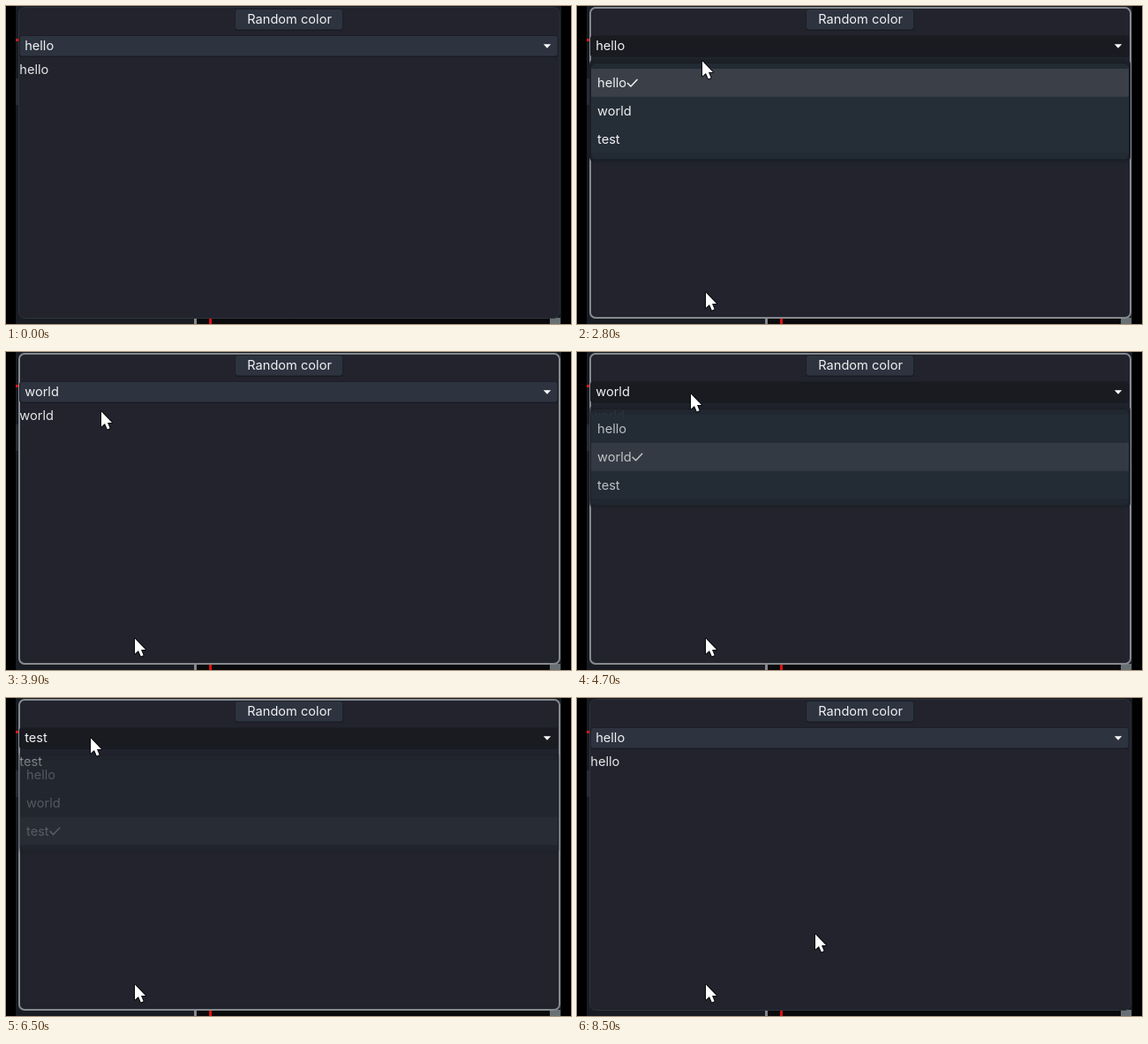
An HTML page with a canvas for the animation above (8.6 s loop, 640 px wide and 360 px high).

```html
<!DOCTYPE html>
<html lang="en">
<head>
<meta charset="utf-8">
<title>Drop-down demo</title>
<style>
  html, body { margin: 0; width: 100%; height: 100%; overflow: hidden; background: #000; }
  canvas { display: block; }
</style>
</head>
<body>
<canvas id="stage" width="640" height="360"></canvas>
<script>
const ctx = document.getElementById('stage').getContext('2d');
const LOOP = 8600, STEP = 100, FADE = 400;
const ITEMS = ['hello', 'world', 'test'];
const ROW_TOP = 71, ROW_HEIGHT = 31.8;
const FACE = '#2d3440', LIGHT = '#f0f1f2', ACCENT = '#17a3ab';

// Pointer moves: start time and goal; the duration follows from the distance
const HOME = [145, 324];
const MOVES = [
  [900, 146, 62], [1800, 141, 62], [2800, 100, 113],
  [3600, 107, 67], [3900, 128, 47], [4900, 57, 142],
  [5600, 95, 45], [6700, 62, 82], [7100, 269, 267]
];
// Times the menu opens and closes; each visit picks the next item
const MENUS = [[2300, 3300], [4400, 5500], [6400, 7200]];

const clamp = v => Math.max(0, Math.min(1, v));

function pointerAt(t) {
  let [x, y] = HOME;
  for (const [start, goalX, goalY] of MOVES) {
    const duration = 200 + 1.8 * Math.hypot(goalX - x, goalY - y);
    const k = clamp((t - start) / duration), eased = k * k * (3 - 2 * k);
    x += (goalX - x) * eased;
    y += (goalY - y) * eased;
    if (k < 1) break;
  }
  return [x, y];
}

function menuAt(t) {
  const state = { selected: 0, alpha: 0, open: false };
  for (const [start, end] of MENUS) {
    if (t < start) break;
    state.open = t < end;
    state.alpha = state.open ? clamp((t - start) / FADE) : clamp(1 - (t - end + STEP) / FADE);
    if (!state.open) state.selected = (state.selected + 1) % ITEMS.length;
  }
  return state;
}

function rect(x, y, w, h, fill) {
  ctx.fillStyle = fill;
  ctx.fillRect(x, y, w, h);
}

function box(x, y, w, h, r, fill, stroke, line = 1) {
  ctx.beginPath();
  ctx.roundRect(x, y, w, h, r);
  if (fill) { ctx.fillStyle = fill; ctx.fill(); }
  if (stroke) { ctx.strokeStyle = stroke; ctx.lineWidth = line; ctx.stroke(); }
}

function text(s, x, y, color = LIGHT) {
  ctx.fillStyle = color;
  ctx.fillText(s, x, y);
}

function poly(points, x, y) {
  ctx.beginPath();
  points.forEach(([px, py]) => ctx.lineTo(x + px, y + py));
}

function raised(x, y, w, h, fill = FACE) {
  box(x, y + 1, w, h, 3, '#15181e');
  box(x, y, w, h, 3, fill, '#1b1f26');
}

function backdrop() {
  rect(0, 0, 640, 360, '#000');
  rect(11, 0, 618, 360, '#191c23');
  rect(11, 37, 3, 3, '#d01818');
  rect(11, 82, 3, 30, '#292c35');
  rect(216, 353, 400, 7, '#0a0a0d');
  rect(213, 353, 3, 7, '#85878a');
  rect(230, 353, 3, 7, '#e01010');
  rect(616, 353, 12, 7, '#687074');
}

function appWindow(focus, open, value) {
  box(14.5, 1.5, 612.5, 352, 7, '#22232d', '#2d343b');
  ctx.globalAlpha = focus;
  box(15, 2, 612, 351, 6, null, '#858a8e', 2);
  ctx.globalAlpha = 1;

  raised(259.5, 3.5, 122, 23.5);
  text('Random color', 273.3, 20);
  raised(15.5, 33.5, 609.5, 23.5, open ? '#191b21' : FACE);
  text(value, 21.2, 50);
  poly([[0, 0], [8.4, 0], [4.2, 4.5]], 608.8, 43.2);
  ctx.fillStyle = '#fff';
  ctx.fill();
  text(value, 15.3, 76.6, '#e6e7e8');
}

function popup(alpha, selected, hover) {
  ctx.globalAlpha = alpha;
  box(14, 60, 613, 117, 6, '#1d2028');
  box(15.5, 64.5, 610, 109.5, 6, '#222a33', '#171b21');
  rect(16, ROW_TOP, 609, 3 * ROW_HEIGHT, '#252d37');
  const hovering = hover in ITEMS, lit = hovering ? hover : selected;
  rect(16, ROW_TOP + lit * ROW_HEIGHT, 609, ROW_HEIGHT, hovering ? ACCENT : '#3a3f48');
  if (hovering) rect(11, 129 + 43 * hover, 3, 43, ACCENT);
  ITEMS.forEach((item, i) => {
    const base = ROW_TOP + 21 + ROW_HEIGHT * i;
    text(item, 23, base);
    if (i !== selected) return;
    poly([[0, 0], [4, 4], [11.5, -4]], 24 + ctx.measureText(item).width, base - 5);
    ctx.strokeStyle = LIGHT;
    ctx.lineWidth = 1.5;
    ctx.stroke();
  });
  ctx.globalAlpha = 1;
}

function pointer(x, y) {
  poly([[0, 0], [0, 17], [4, 13.5], [6.8, 20], [9.6, 18.8], [7, 12.6], [12, 12.4]], x + 1, y + 0.5);
  ctx.closePath();
  ctx.lineJoin = 'round';
  ctx.strokeStyle = '#08090c';
  ctx.lineWidth = 2;
  ctx.stroke();
  ctx.fillStyle = '#fff';
  ctx.fill();
}

function draw(t) {
  const { selected, alpha, open } = menuAt(t);
  const [x, y] = pointerAt(t);
  const focus = t < 8500 ? clamp(t / 200) : 0;

  ctx.font = '14.6px Inter, sans-serif';
  backdrop();
  appWindow(focus, open, ITEMS[selected]);
  if (alpha > 0) popup(alpha, selected, Math.floor((y - ROW_TOP) / ROW_HEIGHT));
  if (t >= STEP) {
    pointer(...HOME);
    pointer(x, y);
  }
}

function tick() {
  draw(Math.floor(performance.now() % LOOP / STEP) * STEP);
  requestAnimationFrame(tick);
}
tick();
</script>
</body>
</html>
```
